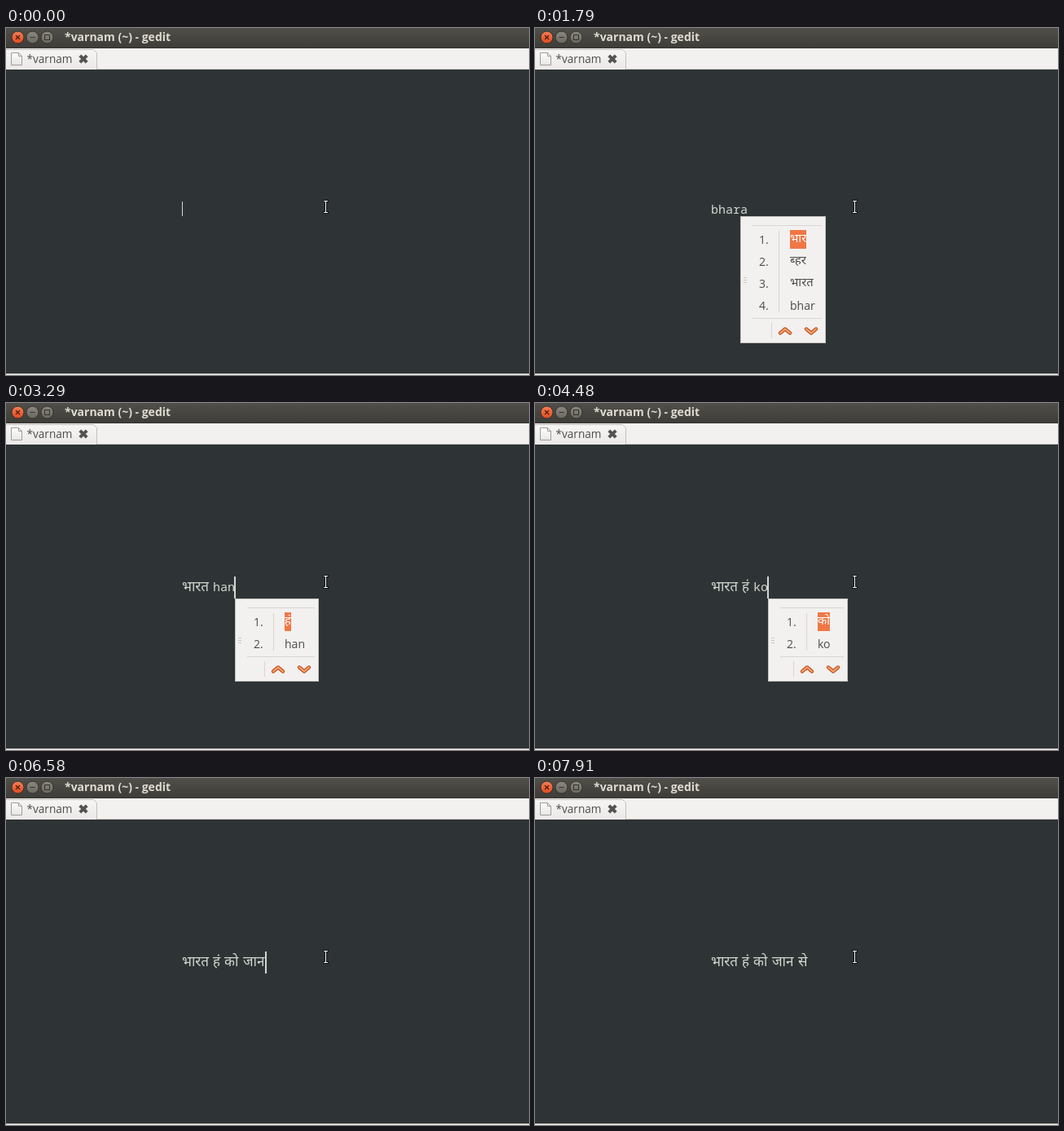
An HTML page with a canvas for the animation above (8 s loop, 642x426 px).

```html
<!DOCTYPE html>
<html lang="en">
<head>
<meta charset="utf-8">
<title>Transliteration typing</title>
<style>
html, body { margin: 0; width: 100%; height: 100%; overflow: hidden; background: #2e3436; }
canvas { display: block; }
</style>
</head>
<body>
<canvas id="stage" width="642" height="426"></canvas>
<script>
const ctx = document.getElementById('stage').getContext('2d');
const LOOP = 8000;
const UI = '"Open Sans", "Noto Sans", sans-serif';
const MONO = '"Noto Sans Mono", monospace';
const HINDI = '"Noto Sans Devanagari", "Noto Sans", sans-serif';
const CELL = 9;

// Committed words and the x where each one starts.
const words = [['भारत', 216], ['हं', 254], ['को', 268], ['जान', 291], ['से', 323]];

// t: start, n: committed words, typed: pending Latin text, caret: x or none,
// list: candidates, at: popup x (default: end of typed text), w: popup width
const states = [
  { t: 0, n: 0, caret: 216 },
  { t: 150, n: 0, typed: 'b', list: ['ब', 'b'] },
  { t: 300, n: 0, typed: 'bh', list: ['भ', 'bh'] },
  { t: 600, n: 0, typed: 'bha', list: ['भ', 'bh'], at: 234 },
  { t: 750, n: 0, typed: 'bha', list: ['भ', 'bh'] },
  { t: 890, n: 0, typed: 'bha', list: ['भा', 'भ', 'bha'], w: 102 },
  { t: 1790, n: 0, typed: 'bhara', list: ['भार', 'ब्हर', 'भारत', 'bhar'], at: 252, w: 105, caret: null },
  { t: 1940, n: 0, typed: 'bharat', list: ['भारा', 'भारत', 'bhara'], at: 261, w: 112 },
  { t: 2090, n: 0, typed: 'bharat', list: ['भारत', 'भरत', 'bharat'], w: 119 },
  { t: 2540, n: 1, caret: 250 },
  { t: 2690, n: 1, caret: 254 },
  { t: 2990, n: 1, typed: 'h', list: ['ह', 'h'] },
  { t: 3140, n: 1, typed: 'ha', list: ['ह', 'ha'] },
  { t: 3290, n: 1, typed: 'han', list: ['हं', 'han'], w: 103 },
  { t: 3890, n: 2, caret: 268 },
  { t: 4180, n: 2, typed: 'k', list: ['क', 'k'] },
  { t: 4330, n: 2, typed: 'ko', list: ['क', 'k'], at: 277 },
  { t: 4480, n: 2, typed: 'ko', list: ['को', 'ko'] },
  { t: 5080, n: 3, caret: 291 },
  { t: 5380, n: 3 },
  { t: 5830, n: 3, typed: 'ja', list: ['ज', 'ja'] },
  { t: 5980, n: 3, typed: 'jan', list: ['जान', 'जन', 'jan'] },
  { t: 6580, n: 4, caret: 319 },
  { t: 6730, n: 4, caret: 323 },
  { t: 7030, n: 4, typed: 's', list: ['स', 's'] },
  { t: 7170, n: 4, typed: 'se', list: ['से', 'se'] },
  { t: 7770, n: 5, caret: 340 },
  { t: 7910, n: 5 }
];

function rect(x, y, w, h, color) {
  ctx.fillStyle = color;
  ctx.fillRect(x, y, w, h);
}

function text(str, x, y, font, color) {
  ctx.font = font;
  ctx.fillStyle = color;
  ctx.fillText(str, x, y);
}

function line(points, color, width) {
  ctx.beginPath();
  points.forEach(([x, y]) => ctx.lineTo(x, y));
  ctx.strokeStyle = color;
  ctx.lineWidth = width;
  ctx.stroke();
}

function cross(x, y, r, color, width) {
  line([[x - r, y - r], [x + r, y + r]], color, width);
  line([[x - r, y + r], [x + r, y - r]], color, width);
}

function fade(y0, y1, top, bottom) {
  const g = ctx.createLinearGradient(0, y0, 0, y1);
  g.addColorStop(0, top);
  g.addColorStop(1, bottom);
  return g;
}

function button(x, top, bottom) {
  ctx.beginPath();
  ctx.arc(x, 11.5, 7.5, 0, Math.PI * 2);
  ctx.fillStyle = fade(4, 19, top, bottom);
  ctx.fill();
  ctx.strokeStyle = '#33322e';
  ctx.lineWidth = 1;
  ctx.stroke();
}

function drawTitleBar() {
  rect(0, 0, 642, 25, fade(0, 25, '#504f49', '#3d3c38'));
  rect(0, 24, 642, 1, '#353430');
  button(14.5, '#f58059', '#e2491c');
  cross(14.5, 11.5, 2.5, '#4a1d0e', 1.2);
  button(32.5, '#8b887e', '#6a675f');
  rect(29.5, 11, 6, 1, '#33322e');
  button(50.5, '#8b887e', '#6a675f');
  ctx.strokeStyle = '#33322e';
  ctx.strokeRect(47.5, 8.5, 6, 6);
  text('*varnam (~) - gedit', 72, 16, 'bold 14px ' + UI, '#dfdbd2');
}

function drawTab() {
  rect(0, 25, 642, 26, '#f2f1f0');
  rect(0, 50, 642, 1, '#cfcbc6');
  ctx.beginPath();
  ctx.roundRect(-5, 26.5, 116.5, 30, 4);
  ctx.save();
  ctx.clip();
  rect(0, 26, 112, 25, fade(26, 51, '#f7f6f5', '#ebe9e7'));
  ctx.restore();
  line([[0, 26.5], [107.5, 26.5], [111.5, 30.5], [111.5, 51]], '#c4c0ba', 1);

  ctx.beginPath();
  [[6.5, 30.5], [15.5, 30.5], [19.5, 34.5], [19.5, 45.5], [6.5, 45.5]].forEach(([x, y]) => ctx.lineTo(x, y));
  ctx.closePath();
  ctx.fillStyle = fade(30, 46, '#fdfdfd', '#e6e6e4');
  ctx.fill();
  ctx.strokeStyle = '#a09d98';
  ctx.lineWidth = 1;
  ctx.stroke();
  line([[15.5, 30.5], [15.5, 34.5], [19.5, 34.5]], '#a09d98', 1);

  text('*varnam', 25.5, 43, '13.6px ' + UI, '#4c4c4c');
  cross(95, 38, 4.2, '#55534f', 4);
}

function drawPointer() {
  rect(389, 211, 7, 3, '#111');
  rect(389, 225, 7, 3, '#111');
  rect(391, 212, 3, 15, '#111');
  rect(390, 212, 5, 1, '#fff');
  rect(390, 226, 5, 1, '#fff');
  rect(392, 213, 1, 13, '#fff');
}

function chevron(x, y, dir) {
  const points = [[x - 6, y + 2.5 * dir], [x, y - 2.5 * dir], [x + 6, y + 2.5 * dir]];
  ctx.lineCap = ctx.lineJoin = 'round';
  line(points, '#c4501f', 4.4);
  line(points, '#f6a873', 2);
  ctx.lineCap = 'butt';
  ctx.lineJoin = 'miter';
}

function drawPopup(x, y, w, list) {
  const h = 48 + 27 * list.length;
  const rule = '#d8d5d1';
  rect(x, y, w, h, '#c6c3be');
  rect(x + 1, y + 1, w - 2, h - 2, '#f2f1f0');
  rect(x + 15, y + 11, w - 20, 1, rule);
  rect(x + 15, y + h - 31, w - 20, 1, rule);
  rect(x + 47, y + 18, 1, h - 56, rule);
  rect(x + w - 67, y + h - 25, 1, 19, rule);
  for (let i = -1; i < 2; i++) rect(x + 4, y + h / 2 + 3 * i, 4, 1, '#c9c6c2');

  list.forEach((word, i) => {
    const base = y + 34 + 27 * i;
    const latin = /[a-z]/.test(word);
    const font = latin ? '14px ' + UI : '14.7px ' + HINDI;
    text(i + 1 + '.', x + 23, base, '14px ' + UI, '#4c4c4c');
    ctx.font = font;
    if (i === 0) rect(x + 61, y + 17, Math.round(ctx.measureText(word).width), 23, '#f07746');
    text(word, x + 61, latin ? base : base - 2, font, i === 0 ? '#fff' : '#4c4c4c');
  });

  chevron(x + w - 50, y + h - 15, 1);
  chevron(x + w - 18, y + h - 15, -1);
}

function drawEditor(s) {
  rect(0, 51, 642, 373, '#2e3436');
  rect(0, 424, 642, 2, '#f2f1f0');
  rect(0, 424, 642, 1, '#b5b1ac');

  const ink = '#d3d7cf';
  const tall = s.n > 0;
  words.slice(0, s.n).forEach(([word, x]) => text(word, x, 231, '17px ' + HINDI, ink));

  const typed = s.typed || '';
  const start = typed ? words[s.n][1] : 0;
  const end = start + CELL * typed.length;
  text(typed, start, tall ? 231 : 228, '15px ' + MONO, ink);

  const caret = s.caret === undefined && typed ? end : s.caret;
  if (caret) rect(tall ? caret - 1 : caret, 213, tall ? 2 : 1, tall ? 27 : 18, ink);
  drawPointer();
  if (s.list) drawPopup(s.at || end, tall ? 240 : 231, s.w || 98, s.list);
}

function draw(now) {
  const t = now % LOOP;
  drawEditor(states.findLast(s => s.t <= t));
  drawTitleBar();
  drawTab();
  requestAnimationFrame(draw);
}

const origin = performance.now();
draw(0);
function tick() {
}
</script>
</body>
</html>
```
